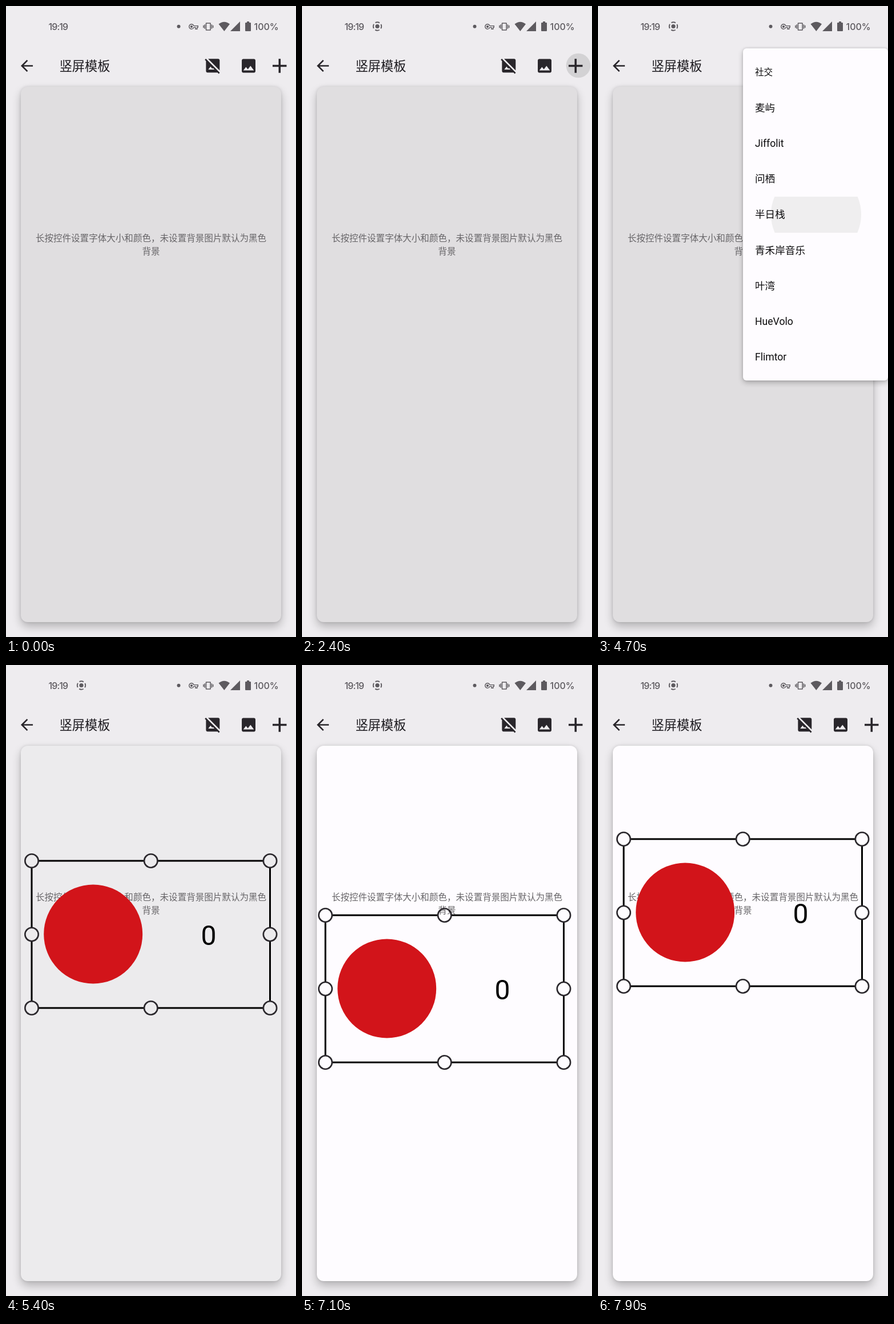
Animation, 508 px wide and 1102 px high, one loop 8000 ms. Source, as an HTML page:

```html
<!DOCTYPE html>
<html lang="zh-CN">
<head>
<meta charset="utf-8">
<title>竖屏模板</title>
<style>
  html, body { margin: 0; width: 100%; height: 100%; overflow: hidden; background: #eeecef; }
  #stage { position: relative; width: 508px; height: 1102px; overflow: hidden;
    font-family: Roboto, "Noto Sans CJK SC", "Noto Sans CJK", sans-serif; }
  #stage > svg { position: absolute; left: 0; top: 0; }
  #card { position: absolute; left: 26px; top: 141px; width: 456px; height: 935px; border-radius: 12px;
    box-shadow: 0 8px 16px rgba(0,0,0,.24), 0 0 5px rgba(0,0,0,.12); }
  .menu { position: absolute; left: 254px; top: 74px; width: 254px; box-sizing: border-box;
    padding: 10.6px 0 10px; border-radius: 6px; background: #fefcff; transform-origin: 100% 0;
    box-shadow: 0 4px 10px rgba(0,0,0,.24), 0 0 4px rgba(0,0,0,.14); }
  .row { position: relative; height: 62.2px; line-height: 62.2px; padding-left: 21px; overflow: hidden;
    font-size: 17.6px; color: #0c0b0d; white-space: nowrap; }
  .row.head { font-size: 15.6px; }
  .row span { position: relative; }
  .ripple { position: absolute; left: 128px; top: 31px; width: 0; height: 0; border-radius: 50%;
    background: #efeeef; transform: translate(-50%, -50%); }
  .status { fill: #5d5a5f; font: 500 16px Inter, sans-serif; }
  .bar { fill: #29262b; }
  .hint { fill: #676568; font-size: 15.55px; text-anchor: middle; }
</style>
</head>
<body>
<div id="stage">
  <div id="card"></div>
  <svg width="508" height="1102" viewBox="0 0 508 1102">
    <g class="status">
      <text x="74.5" y="41.7" letter-spacing="-.9">19:19</text>
      <g id="cast">
        <circle cx="132" cy="35.5" r="3.6"/>
        <circle cx="132" cy="35.5" r="7.2" fill="none" stroke="#5d5a5f" stroke-width="1.9"
          stroke-dasharray="7.8 3.51" stroke-dashoffset="3.9"/>
      </g>
      <circle cx="302.5" cy="35.8" r="3"/>
      <path transform="translate(328.5 36) scale(.7) translate(-12 -12)" d="M22 19h-6v-4h-2.68c-1.14 2.42-3.6 4-6.32 4-3.86 0-7-3.14-7-7s3.14-7 7-7c2.72 0 5.17 1.58 6.32 4H24v6h-2v4zm-4-2h2v-4h2v-2H11.94l-.23-.67C11.01 8.34 9.11 7 7 7c-2.76 0-5 2.24-5 5s2.24 5 5 5c2.11 0 4.01-1.34 4.71-3.33l.23-.67H18v4zM7 15c-1.65 0-3-1.35-3-3s1.35-3 3-3 3 1.35 3 3-1.35 3-3 3z"/>
      <path transform="translate(354.3 36) scale(.76) translate(-12 -12)" d="M0 15h2V9H0v6zm3 2h2V7H3v10zm19-8v6h2V9h-2zm-3 8h2V7h-2v10zM16.5 3h-9C6.67 3 6 3.67 6 4.5v15c0 .83.67 1.5 1.5 1.5h9c.83 0 1.5-.67 1.5-1.5v-15c0-.83-.67-1.5-1.5-1.5zM16 19H8V5h8v14z"/>
      <path d="M382.3 44L372.5 31.6Q382.3 24 392 31.6ZM393 44H410V27ZM420 29H422V27H426V29H428Q429 29 429 30V43Q429 44 428 44H420Q419 44 419 43V30Q419 29 420 29Z"/>
      <text x="434.5" y="41.7">100%</text>
    </g>
    <g class="bar">
      <path transform="translate(36.5 104.5) scale(1.32) translate(-12 -12)" d="M20 11H7.83l5.59-5.59L12 4l-8 8 8 8 1.41-1.41L7.83 13H20v-2z"/>
      <text x="93.7" y="113.2" font-size="22.2" fill="#1d1b20">竖屏模板</text>
      <path transform="translate(362.3 104.3) scale(1.33) translate(-12 -12)" d="M21 5c0-1.1-.9-2-2-2H5.83L21 18.17V5zM2.81 2.81L1.39 4.22 3 5.83V19c0 1.1.9 2 2 2h13.17l1.61 1.61 1.41-1.41L2.81 2.81zM6 17l3-4 2.25 3 .82-1.1 2.1 2.1H6z"/>
      <path transform="translate(425 104.5) scale(1.33) translate(-12 -12)" d="M21 19V5c0-1.1-.9-2-2-2H5c-1.1 0-2 .9-2 2v14c0 1.1.9 2 2 2h14c1.1 0 2-.9 2-2zM8.5 13.5l2.5 3.01L14.5 12l4.5 6H5l3.5-4.5z"/>
      <circle id="press" cx="484" cy="104" r="21.3" fill="#d3d2d4"/>
      <path d="M467 104.5H491.5M479.3 92.3V116.7" stroke="#29262b" stroke-width="3.6"/>
    </g>
    <text class="hint" x="254" y="411">长按控件设置字体大小和颜色，未设置背景图片默认为黑色</text>
    <text class="hint" x="254" y="433.6">背景</text>
    <g id="widget">
      <circle cx="107.7" cy="128" r="86.5" fill="#d2141a"/>
      <text x="310" y="147" font-size="48" text-anchor="middle">0</text>
      <g id="frame" fill="none"></g>
    </g>
  </svg>
</div>
<script>
const $ = id => document.getElementById(id);
const LOOP = 8000, STEP = 100;

// Selection frame: handles joined by lines that stop at their rims
const W = 417.5, H = 257, R = 11.7;
let lines = '', rings = '';
for (const x of [0, W / 2, W]) for (const y of [0, H / 2, H]) {
  if (x === W / 2 && y === H / 2) continue;
  rings += `<circle cx="${x}" cy="${y}" r="${R}"/>`;
  if (y !== H / 2 && x < W) lines += `M${x + R} ${y}h${W / 2 - 2 * R}`;
  if (x !== W / 2 && y < H) lines += `M${x} ${y + R}v${H / 2 - 2 * R}`;
}
$('frame').innerHTML = `<path d="${lines}" stroke="#000" stroke-width="3"/>` +
  `<g stroke="#2b282d" stroke-width="2.6">${rings}</g>`;

function makeMenu(labels, pressed, hasHead) {
  const el = document.createElement('div');
  el.className = 'menu';
  el.innerHTML = labels.map((label, i) =>
    `<div class="row${hasHead && !i ? ' head' : ''}">` +
    `${i === pressed ? '<div class="ripple"></div>' : ''}<span>${label}</span></div>`).join('');
  $('stage').append(el);
  return { el, ripple: el.querySelector('.ripple') };
}
const groups = makeMenu(['时间', '日期', '社交', '文本'], 2);
const apps = makeMenu(['社交', '麦屿', 'Jiffolit', '问栖', '半日栈', '青禾岸音乐', '叶湾', 'HueVolo', 'Flimtor'], 4, true);

// Held steps: [time, value...]
const castSteps = [[0, 0], [400, .5], [500, 1]];
const pressSteps = [[0, 0], [2400, 1], [2600, 0]];
const cardSteps = [[0, '#e0dee0'], [5400, '#ecebed'], [5500, '#fefcff']];
// opacity, scale, ripple radius
const groupSteps = [[0, 0, 1, 0], [2500, .45, .8, 0], [2600, .85, .95, 0], [2700, 1, 1, 0],
  [3400, 1, 1, 79], [3500, .7, 1, 150], [3600, .25, 1, 150], [3700, 0, 1, 0]];
const appSteps = [[0, 0, 1, 0], [3600, .45, .8, 0], [3700, .85, .95, 0], [3800, 1, 1, 0],
  [4700, 1, 1, 79], [4800, 1, 1, 150], [4900, .65, 1, 150], [5000, .25, 1, 150], [5100, 0, 1, 0]];

// Drag path, one position per step
const SHOW = 4900, DRAG = 6500, HOME = [45, 342];
const dragY = [359, 455, 590, 700, 746, 640, 437, 270, 210, 202, 255, 350, 423, 385, 304];
const dragX = [0, 0, 0, 0, -1, -2, -4, -6, -8, -8, -7, -5, -3, -1, 0];

const held = (steps, t) => steps.findLast(s => s[0] <= t);

function setMenu({ el, ripple }, [, alpha, scale, radius]) {
  el.style.opacity = alpha;
  el.style.visibility = alpha ? 'visible' : 'hidden';
  el.style.transform = `scale(${scale})`;
  ripple.style.width = ripple.style.height = radius * 2 + 'px';
}

function draw(time) {
  const t = Math.floor(time % LOOP / STEP) * STEP;
  $('cast').setAttribute('opacity', held(castSteps, t)[1]);
  $('press').setAttribute('opacity', held(pressSteps, t)[1]);
  $('card').style.background = held(cardSteps, t)[1];
  setMenu(groups, held(groupSteps, t));
  setMenu(apps, held(appSteps, t));
  const i = (t - DRAG) / STEP;
  const x = HOME[0] + (i < 0 ? 0 : dragX[i]);
  const y = i < 0 ? HOME[1] : dragY[i];
  $('widget').setAttribute('transform', `translate(${x} ${y})`);
  $('widget').setAttribute('visibility', t < SHOW ? 'hidden' : 'visible');
}

const start = performance.now();
function tick() {
  draw(performance.now() - start);
  requestAnimationFrame(tick);
}
tick();
</script>
</body>
</html>
```
